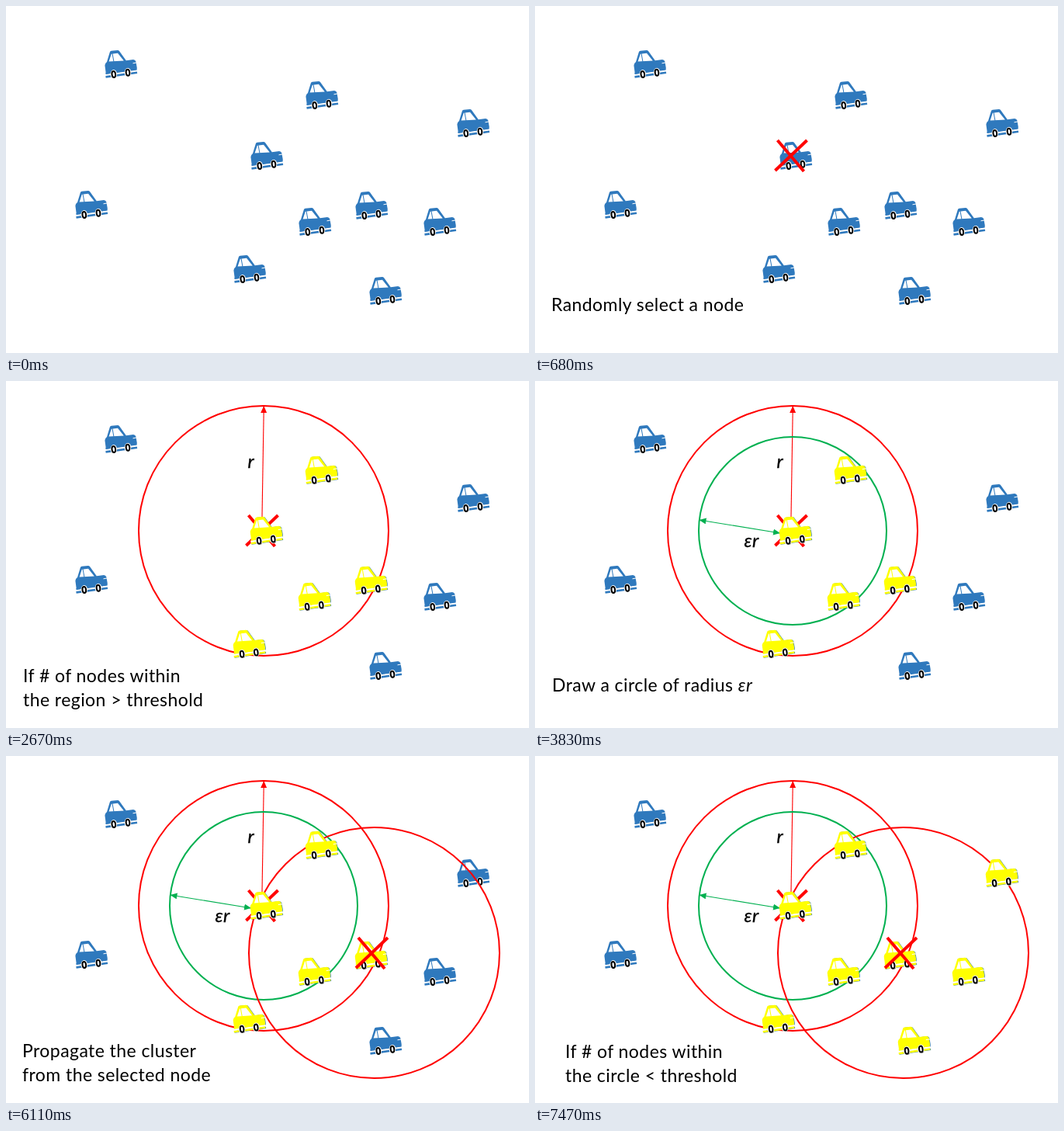
Write an HTML page that moves like this. It is 674 px wide and 447 px high and loops after 8000 ms.

```html
<!DOCTYPE html>
<html lang="en">
<head>
<meta charset="utf-8">
<title>Clustering of vehicle nodes</title>
<style>
  html, body { margin: 0; width: 100%; height: 100%; overflow: hidden; background: #fff; }
  svg { display: block; width: 674px; height: 447px; }
  text { font: 23px Lato, "Open Sans", sans-serif; letter-spacing: .43px; }
  .it { font-style: italic; }
  .label { font-size: 24px; font-style: italic; stroke: #000; stroke-width: .3px; }
</style>
</head>
<body>
<svg id="stage" viewBox="0 0 674 447">
  <defs>
    <g id="car">
      <path d="M.4 19.5Q.7 16.5 3 15L6.8 2.5Q7.2 1.1 8.8.8L16.6-.1Q18.2-.2 19 .9L27.8 13.2L37 12Q39.6 12 40.4 14.5L41.8 22.7Q41.8 25.2 40 25.7L2 31.5Z"/>
      <path d="M5.6 14.6L8.8 4.7L17 3.7L24.8 13.4Z" fill="#fff"/>
      <path d="M10 4L12 15" stroke="currentColor"/>
      <path d="M36.5 16.8L41 16" stroke="#fff"/>
      <path d="M1 32.3L42 26.6" stroke="#fff" stroke-width="3"/>
      <path d="M1.5 30L41.5 24.5" stroke="currentColor" stroke-width="2"/>
      <path d="M1.5 34.4L42 28.7" stroke="currentColor" stroke-width="2.6"/>
      <g id="wheel">
        <ellipse cx="11.8" cy="31" rx="4.3" ry="6" fill="#fff"/>
        <ellipse cx="11.8" cy="31" rx="2.3" ry="4" fill="#fff" stroke="#000" stroke-width="2" transform="rotate(-8 11.8 31)"/>
      </g>
      <use href="#wheel" x="18.2" y="-2.2"/>
    </g>
    <path id="cross" d="M-17-20L17 20M21-20L-20 19" stroke="#f00" stroke-width="4"/>
    <marker id="tip" viewBox="0 0 9 8" refX="9" refY="4" markerWidth="9" markerHeight="8"
      markerUnits="userSpaceOnUse" orient="auto-start-reverse">
      <path d="M0 0L9 4L0 8Z" fill="context-stroke"/>
    </marker>
  </defs>
</svg>
<script>
const LOOP = 8000, stage = document.getElementById('stage'), timed = [];

// Adds markup that is visible from one time to another.
function add(markup, from = 0, to = LOOP) {
  const g = document.createElementNS('http://www.w3.org/2000/svg', 'g');
  g.innerHTML = markup;
  stage.append(g);
  timed.push({ g, from, to });
}
const car = ([x, y], color, from) =>
  add(`<use href="#car" x="${x}" y="${y}" fill="${color}" color="${color}"/>`, from);
const marked = ([x, y], from) => car([x - .7, y - .2], '#ff0', from);
const ring = (x, y, r, color, from) =>
  add(`<circle cx="${x}" cy="${y}" r="${r}" fill="none" stroke="${color}" stroke-width="2"/>`, from);
const arrow = (d, color, from) =>
  add(`<path d="${d}" stroke="${color}" stroke-width="1.1" marker-start="url(#tip)" marker-end="url(#tip)"/>`, from);
const cross = (x, y, from) => add(`<use href="#cross" x="${x}" y="${y}"/>`, from);
const label = (x, y, s, from) => add(`<text class="label" x="${x}" y="${y}">${s}</text>`, from);
const words = (x, y, lines, from, to) =>
  add(lines.map((s, i) => `<text x="${x}" y="${y + 31 * i}">${s}</text>`).join(''), from, to);
const it = s => `<tspan class="it">${s}</tspan>`;

const RED = '#f00', GREEN = '#00b050';
const first = [[386, 97], [315, 175], [377, 260], [450, 239], [293, 321]];
const second = [[581, 133], [538, 260], [468, 349]];
const rest = [[127, 57], [89, 238]];

for (const p of [...first, ...second, ...rest]) car(p, '#2f79bd');
cross(329.5, 193, 680);
ring(332, 193, 161, RED, 1530);
arrow('M329.7 194L332.3 32', RED, 1530);
label(311.5, 112, 'r', 1530);
ring(332, 193, 121, GREEN, 3830);
arrow('M211.5 179L316 196', GREEN, 3830);
label(269.5, 214, 'εr', 3830);
ring(474.5, 253.5, 161.5, RED, 6110);
for (const p of first) marked(p, 2670);
for (const p of second) marked(p, 7470);
cross(471, 254, 5010);

words(21, 393, ['Randomly select a node'], 680, 1530);
words(21, 393, [`Draw a circle of radius ${it('r')}`, 'from the selected node'], 1530, 2670);
words(22, 388, ['If # of nodes within', 'the region &gt; threshold'], 2670, 3830);
words(22, 400, [`Draw a circle of radius ${it('εr')}`], 3830, 5010);
words(22, 388, ['Select a node between', 'the two circles'], 5010, 6110);
words(21, 388, ['Propagate the cluster', 'from the selected node'], 6110, 7470);
words(39, 389, ['If # of nodes within', 'the circle &lt; threshold'], 7470);

function draw() {
  const t = performance.now() % LOOP;
  for (const { g, from, to } of timed) g.style.display = t >= from && t < to ? '' : 'none';
  requestAnimationFrame(draw);
}
draw();
</script>
</body>
</html>
```
